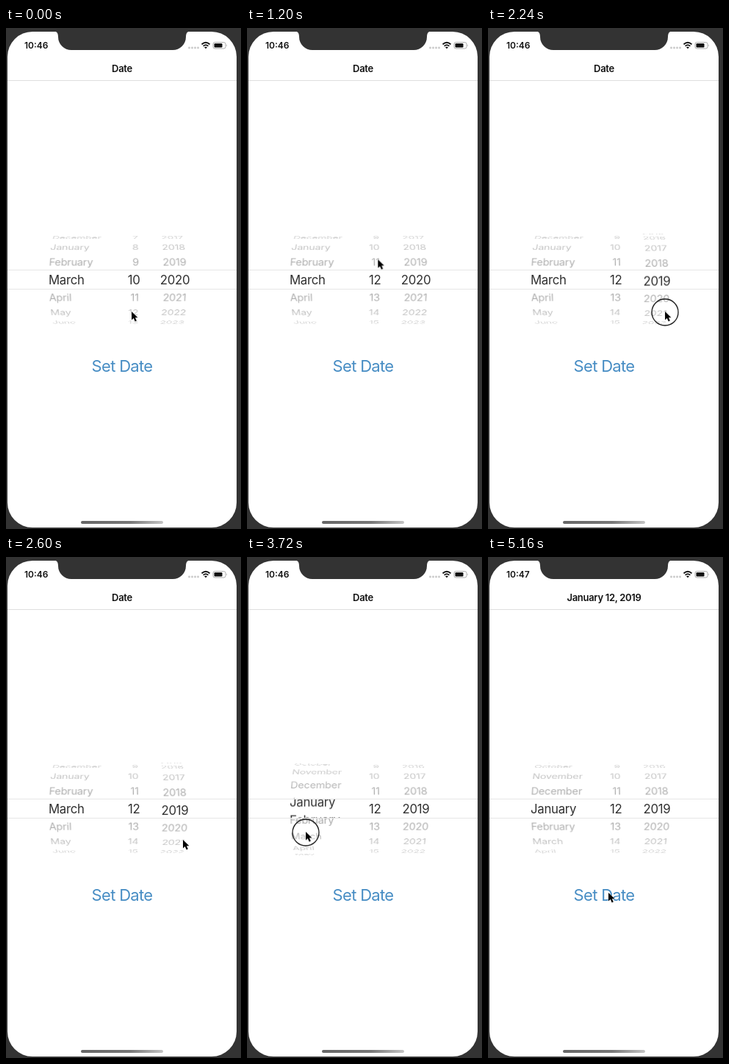
An HTML page for the animation above (5.44 s loop, 320x682 px).

```html
<!DOCTYPE html>
<html lang="en">
<head>
<meta charset="utf-8">
<title>Date picker</title>
<style>
:root { --loop: 5440ms; --step: 20.6deg; --radius: 69px; }
html, body { margin: 0; width: 100%; height: 100%; overflow: hidden; background: #333; }
body { position: relative; font-family: Inter, Roboto, sans-serif; color: #111; }
body *, svg { position: absolute; box-sizing: border-box; }
svg * { position: static; }

.stage { left: 0; top: 0; width: 320px; height: 682px; overflow: hidden; }
.screen { left: 2px; top: 5px; width: 312px; height: 675px; border-radius: 34px; background: #fff; }
.chrome { left: 0; top: 0; }
.rule { left: 2px; top: 71px; width: 312px; height: 1px; background: #dedede; }
.home { left: 102px; top: 670.5px; width: 112px; height: 4px; border-radius: 2px;
  background: linear-gradient(90deg, #666, #777 60%, #c4c4c4); }

.clock { left: 25px; top: 16px; font: 600 12px/16px Inter, Roboto, sans-serif; white-space: nowrap; }
.title { left: 2px; top: 45px; width: 312px; text-align: center;
  font: 600 13px/20px Inter, Roboto, sans-serif; letter-spacing: -.3px; }
.button { left: 2px; top: 446px; width: 312px; text-align: center; color: #478dc4;
  font-size: 22px; line-height: 29px; letter-spacing: -.7px; animation: press var(--loop) infinite; }
.before { animation: before var(--loop) step-end infinite; }
.after { animation: after var(--loop) step-end infinite; }

/* Picker: a grey drum behind, a larger dark one inside the selection band */
.drum { left: 0; top: 276px; width: 320px; height: 134px; perspective: 670px;
  perspective-origin: 158px 67px; color: #aaa; font-size: 14.5px; letter-spacing: -.15px; }
.outer { -webkit-mask: linear-gradient(#0006, #000 35% 65%, #0006);
  mask: linear-gradient(#0006, #000 35% 65%, #0006); }
.band { left: 2px; top: 329px; width: 312px; height: 27px; overflow: hidden;
  background: #fff; border: solid #e6e6e6; border-width: 1px 0; }
.band .drum { left: -2px; top: -54px; color: #303030; font-size: 16.8px; letter-spacing: -.3px; }
.wheel { top: 55px; height: 24px; line-height: 24px; transform-style: preserve-3d;
  animation: var(--loop) linear infinite; }
.wheel span { inset: 0; white-space: nowrap; backface-visibility: hidden;
  transform: rotateX(calc(var(--row) * -1 * var(--step))) translateZ(var(--radius)); }
.month { left: 58px; width: 100px; animation-name: month; }
.day { left: 131px; width: 50px; text-align: right; animation-name: day; }
.band .day { width: 51.5px; }
.year { left: 190px; width: 80px; text-align: center; animation-name: year; }

.pointer { left: 0; top: 0; width: 1px; height: 1px; overflow: visible; animation: pointer var(--loop) infinite; }
.ring { animation: ring var(--loop) step-end infinite; }

@keyframes month {
  0%, 61.76% { transform: translateZ(-69px) rotateX(41.2deg); animation-timing-function: ease-in; }
  68.38% { transform: translateZ(-69px) rotateX(7.8deg); animation-timing-function: linear; }
  71.32% { transform: translateZ(-69px) rotateX(2.5deg); animation-timing-function: ease-out; }
  76.47%, 100% { transform: translateZ(-69px) rotateX(0deg); }
}
@keyframes day {
  0%, 11.03% { transform: translateZ(-69px) rotateX(0deg); animation-timing-function: ease-in; }
  13.97% { transform: translateZ(-69px) rotateX(14.2deg); animation-timing-function: linear; }
  17.65% { transform: translateZ(-69px) rotateX(35deg); animation-timing-function: ease-out; }
  22.06%, 100% { transform: translateZ(-69px) rotateX(41.2deg); }
}
@keyframes year {
  0%, 34.93% { transform: translateZ(-69px) rotateX(0deg); animation-timing-function: ease-in-out; }
  42.28%, 45.5% { transform: translateZ(-69px) rotateX(-23deg); }
  47.79% { transform: translateZ(-69px) rotateX(-22.3deg); animation-timing-function: ease-out; }
  52.2%, 100% { transform: translateZ(-69px) rotateX(-20.6deg); }
}
@keyframes pointer {
  0% { transform: translate(171px, 386px); }
  8.82%, 10.29% { transform: translate(173px, 365px); animation-timing-function: ease-in; }
  13.97% { transform: translate(173px, 339px); animation-timing-function: ease-out; }
  18.38%, 20.59% { transform: translate(174px, 313px); animation-timing-function: ease-in-out; }
  29.04%, 33.09% { transform: translate(243px, 348px); animation-timing-function: ease-in-out; }
  42.28% { transform: translate(241px, 387px); }
  47.79% { transform: translate(241px, 385px); animation-timing-function: ease-in-out; }
  52.94% { transform: translate(91px, 334px); animation-timing-function: linear; }
  53.68%, 60.29% { transform: translate(81px, 330px); animation-timing-function: ease-in-out; }
  68.38% { transform: translate(80px, 374px); animation-timing-function: ease-out; }
  70.59%, 72.79% { transform: translate(80px, 379px); animation-timing-function: ease-in-out; }
  80.15% { transform: translate(154px, 450px); animation-timing-function: ease-out; }
  81.62%, 100% { transform: translate(164px, 457px); }
}
@keyframes ring {
  0% { opacity: 0; } 9.56% { opacity: 1; } 19.12% { opacity: 0; }
  30.15% { opacity: 1; } 44.12% { opacity: 0; }
  53.68% { opacity: 1; } 71.32%, 100% { opacity: 0; }
}
@keyframes press {
  0%, 87.49% { opacity: 1; } 87.5%, 88.97% { opacity: .3; } 94.85%, 100% { opacity: 1; }
}
@keyframes before { 0% { opacity: 1; } 88.97%, 100% { opacity: 0; } }
@keyframes after { 0% { opacity: 0; } 88.97%, 100% { opacity: 1; } }
</style>
</head>
<body>
<div class="stage">
  <div class="screen"></div>
  <svg class="chrome" width="320" height="72">
    <path fill="#333" d="M65 4Q71 5 71 11V12A18 18 0 0 0 89 30H227A18 18 0 0 0 245 12V11Q245 5 251 4Z"/>
    <g fill="#c8c8c8">
      <circle cx="249.500" cy="27" r="1.400"/><circle cx="253.500" cy="27" r="1.400"/>
      <circle cx="257.500" cy="27" r="1.400"/><circle cx="261.500" cy="27" r="1.400"/>
    </g>
    <path d="M266.500 22.200Q272 17.400 277.500 22.200M268.600 24.600Q272 21.600 275.400 24.600"
      fill="none" stroke="#111" stroke-width="1.800"/>
    <path fill="#111" d="M270 26.200Q272 24.700 274 26.200L272 28.300Z"/>
    <rect x="282" y="19.500" width="17" height="8.500" rx="2.400" fill="none" stroke="#aaa"/>
    <rect x="283.500" y="21" width="11" height="5.500" rx="1.200" fill="#111"/>
    <path fill="#aaa" d="M300.300 22.200Q302 23.700 300.300 25.300Z"/>
  </svg>
  <div class="clock before">10:46</div>
  <div class="clock after">10:47</div>
  <div class="title before">Date</div>
  <div class="title after">January 12, 2019</div>
  <div class="rule"></div>
  <div class="drum outer"></div>
  <div class="band"><div class="drum"></div></div>
  <div class="button">Set Date</div>
  <div class="home"></div>
  <svg class="pointer">
    <circle class="ring" cy="1" r="18" fill="none" stroke="#111" stroke-width="1.300"/>
    <path d="M0 0V11.600L2.700 9.100 4.700 13.400 6.800 12.400 4.900 8.300H8.400Z"
      fill="#000" stroke="#fff" stroke-width=".8" paint-order="stroke"/>
  </svg>
</div>
<script>
const months = ['January', 'February', 'March', 'April', 'May', 'June', 'July',
  'August', 'September', 'October', 'November', 'December'];

// Row 0 is the one facing the viewer when a wheel has no rotation.
const wheels = {
  month: row => months[(row + 12) % 12],
  day: row => 10 + row,
  year: row => 2020 + row,
};
const firstRow = { month: -4, day: -4, year: -5 };

for (const drum of document.querySelectorAll('.drum')) {
  for (const [name, label] of Object.entries(wheels)) {
    const wheel = document.createElement('div');
    wheel.className = `wheel ${name}`;
    for (let row = firstRow[name]; row < firstRow[name] + 11; row++) {
      const item = document.createElement('span');
      item.textContent = label(row);
      item.style.setProperty('--row', row);
      wheel.append(item);
    }
    drum.append(wheel);
  }
}
</script>
</body>
</html>
```
